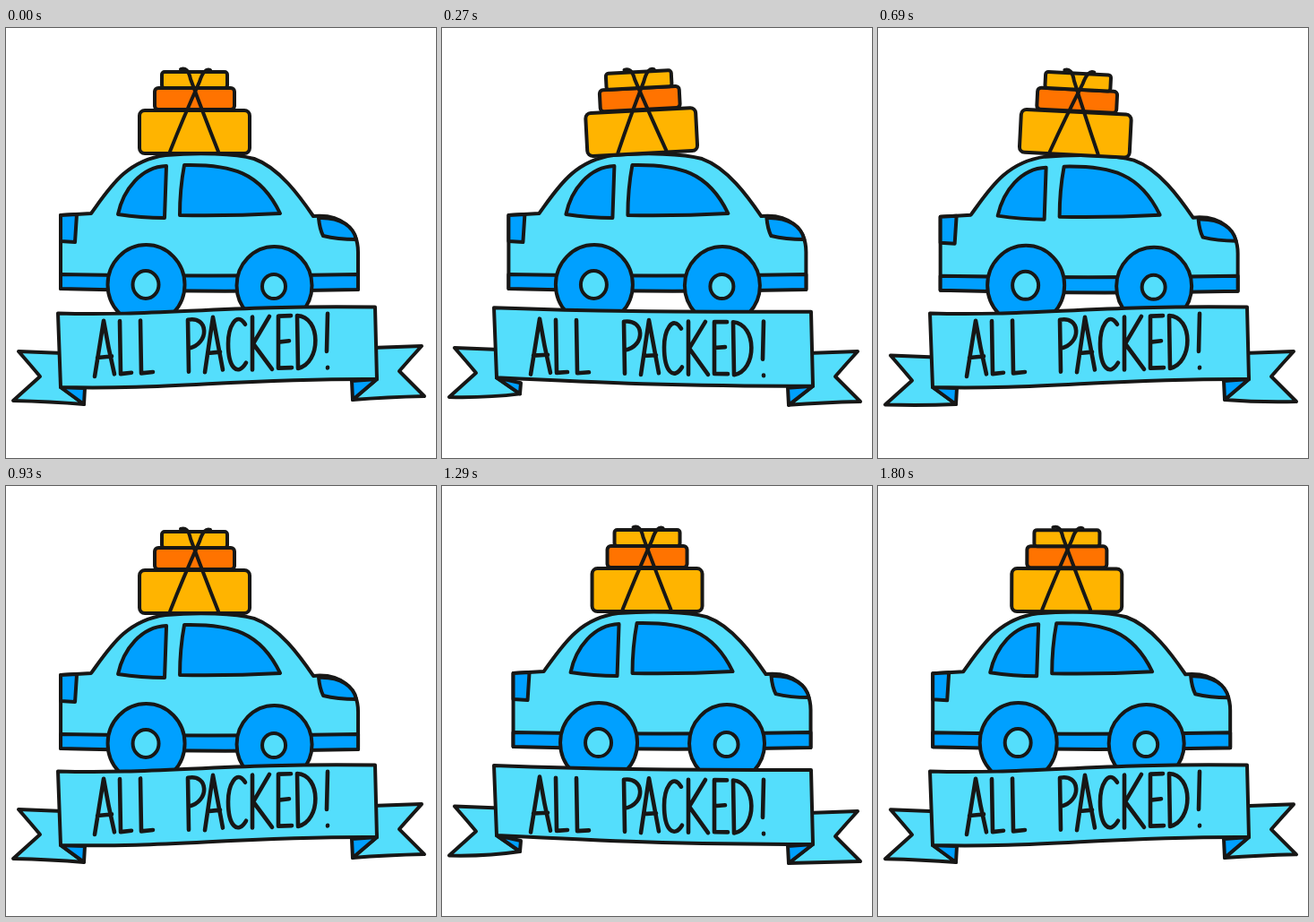
An HTML page for the animation above (1830 ms loop, 480x480 px).

```html
<!DOCTYPE html>
<html lang="en">
<head>
<meta charset="utf-8">
<title>All packed!</title>
<style>
  html, body { margin: 0; width: 100%; height: 100%; overflow: hidden; background: #fff; }
  svg { display: block; width: 100%; height: 100%; }
  svg * { stroke: #171716; stroke-width: 4; stroke-linecap: round; stroke-linejoin: round; }
  .sky { fill: #54defc; }
  .blue { fill: #00a0ff; }
  .yellow { fill: #ffb400; }
  .orange { fill: #ff7300; }
  .line { fill: none; }
  #lettering path { stroke-width: 4.6; fill: none; }
</style>
</head>
<body>
<svg viewBox="0 0 480 480">
  <g id="body">
    <path class="sky" d="M61 209 L95 207 C116 178 134 148 178 142 C215 139 255 140 277 146 C305 156 328 188 343 210 C374 207 393 224 393 250 L393 292 L61 291 Z"/>
    <path class="blue" d="M61 275 Q225 278 393 275 L393 292 Q225 296 61 291 Z"/>
    <path class="blue" d="M61 209 L79 208 L77 239 L61 238 Z"/>
    <path class="blue" d="M349 212 C374 211 388 222 391 236 Q370 236 354 232 Q350 224 349 212 Z"/>
    <path class="blue" d="M179 154 C151 155 131 180 125 208 Q151 212 177 212 Z"/>
    <path class="blue" d="M199 153 C252 152 284 161 306 207 Q250 210 194 209 Q194 180 199 153 Z"/>
    <g id="luggage">
      <rect class="yellow" x="149" y="92" width="123" height="48" rx="6"/>
      <rect class="orange" x="166" y="67" width="89" height="24" rx="4"/>
      <rect class="yellow" x="174" y="49" width="73" height="18" rx="3"/>
      <path class="line" d="M195 46 Q203 43 206 57 Q220 95 237 138"/>
      <path class="line" d="M228 47 Q221 44 216 60 Q198 100 183 138"/>
    </g>
  </g>
  <g id="wheels">
    <ellipse class="blue" cx="156.5" cy="287" rx="43" ry="44.5"/>
    <ellipse class="sky" cx="156" cy="287" rx="14.5" ry="15.5"/>
    <ellipse class="blue" cx="299.5" cy="288" rx="42" ry="43.5"/>
    <ellipse class="sky" cx="299" cy="289" rx="13" ry="13.5"/>
  </g>
  <path class="sky" id="leftTail"/>
  <path class="sky" id="rightTail"/>
  <path class="blue" id="leftFold"/>
  <path class="blue" id="rightFold"/>
  <path class="sky" id="banner"/>
  <g id="lettering" role="img" aria-label="ALL PACKED!">
    <path d="M99 390 L109 328 Q114 358 121 388 M102 369 L118 368"/>
    <path d="M127 329 L128 388 L140 387 M150 329 L151 388 L164 387"/>
    <path d="M204 388 L203 330 C226 326 228 357 204 362"/>
    <path d="M222 389 L231 328 L242 387 M225 368 L239 367"/>
    <path d="M267 337 C257 321 248 340 248 358 C248 386 259 395 268 380"/>
    <path d="M275 329 L275 388 M294 329 L276 359 L297 388"/>
    <path d="M318 329 L304 329 L304 387 L319 387 M304 358 L316 357"/>
    <path d="M325 329 L326 388 C352 383 352 331 325 329"/>
    <path d="M359 328 L358 370 M359 388 L359 388.5"/>
  </g>
</svg>
<script>
const LOOP = 1830, STEP = 30, SWAY = LOOP / 2;
const el = id => document.getElementById(id);
const draw = (id, d) => el(id).setAttribute('d', d);
const move = (id, transform) => el(id).setAttribute('transform', transform);

// Eased interpolation through [phase, value] points.
function track(points, phase) {
  const i = points.findIndex(([at]) => at > phase);
  const [t0, a] = points[i - 1], [t1, b] = points[i];
  const u = (phase - t0) / (t1 - t0);
  return a + (b - a) * u * u * (3 - 2 * u);
}

const tilt = [[0, 0], [.25, -3], [.3, -3], [.41, 0], [.74, 2.9], [.78, 2.9], [1, 0]];
const rock = [[0, 0], [.33, 1], [.42, 1], [.74, 0], [1, 0]];
const leftLift = [[0, 0], [.295, -4], [.41, -3.5], [.7, 4.5], [.76, 4.5], [1, 0]];
const rightLift = [[0, 0], [.295, 6], [.41, 8], [.7, 6.3], [.76, 6], [1, 0]];

function drawBanner(phase) {
  const r = track(rock, phase);
  const l = track(leftLift, phase), k = track(rightLift, phase);
  const mix = (a, b) => (a + (b - a) * r).toFixed(3);
  const bottomL = mix(401, 390), bottomR = mix(392, 400);
  const tipL = mix(420, 408), tipR = mix(415, 421);
  const foldL = mix(402, 396), foldR = mix(394, 402);

  draw('banner', `M58 ${mix(318.5, 312)} C170 ${mix(322, 316)} 240 ${mix(309, 317)} 412 ${mix(311.5, 317)}
    L414 ${bottomR} C260 ${mix(391, 400)} 180 ${mix(404, 396)} 61 ${bottomL} Z`);
  draw('leftTail', `M64 ${363 + l} L14 ${361 + l} Q28 ${377 + l} 38 ${389 + l}
    L8 ${416 + l} Q50 ${417 + l} 87 ${tipL} L61 ${bottomL} Z`);
  draw('leftFold', `M61 ${bottomL} L87 ${tipL} L88 ${foldL} Z`);
  draw('rightTail', `M408 ${357 + k} L464 ${355 + k} Q452 ${368 + k} 439 ${383 + k}
    L467 ${411 + k} Q425 ${412 + k} 387 ${tipR} L414 ${bottomR} Z`);
  draw('rightFold', `M414 ${bottomR} L387 ${tipR} L386 ${foldR} Z`);
  move('lettering', `translate(100 ${mix(-1, -3.5)}) skewY(${mix(-1.8, .75)}) translate(-100 0)`);
}

function render(ms) {
  const t = Math.floor(ms % LOOP / STEP) * STEP;
  const phase = t % SWAY / SWAY;
  const lead = phase + .02 * Math.sin(Math.PI * phase);
  const x = 19.5 * Math.sin(Math.PI * lead) ** 2;
  const bounce = 1 - Math.cos(14 * Math.PI * t / LOOP);
  move('body', `translate(${x} ${bounce})`);
  move('wheels', `translate(${x} ${bounce / 2 - .5})`);
  move('luggage', `rotate(${track(tilt, phase)} 210 139)`);
  drawBanner(phase);
}

const start = performance.now();
function tick() {
  render(performance.now() - start);
  requestAnimationFrame(tick);
}
tick();
</script>
</body>
</html>
```
